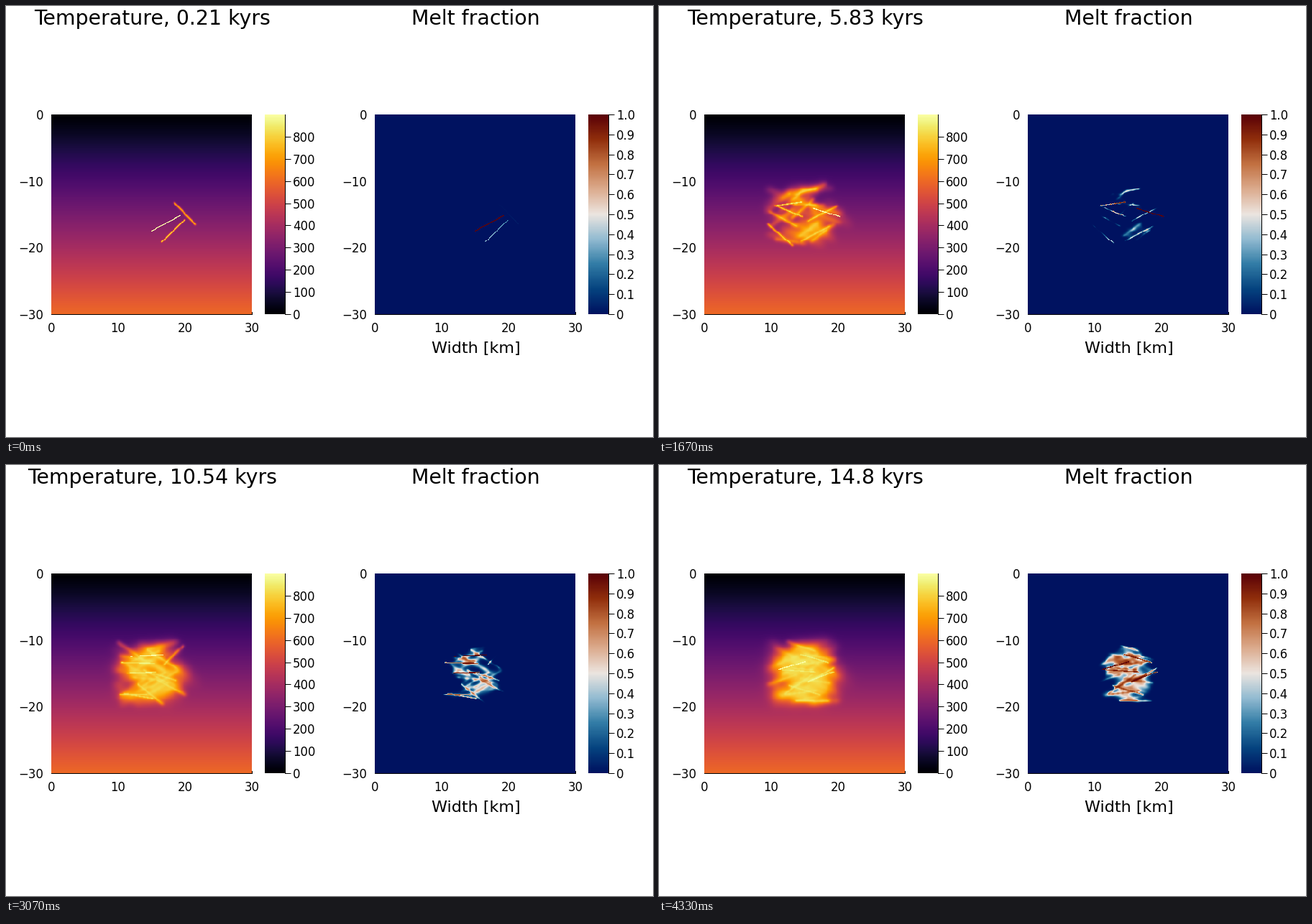
A matplotlib script that plays this animation: 900 px wide and 600 px high, repeating every 4390 ms.

```python
import numpy as np
import matplotlib.pyplot as plt
from matplotlib.animation import FuncAnimation
from matplotlib.colors import LinearSegmentedColormap

W, H, DPI = 900, 600, 100
FRAMES, LOOP_MS = 66, 4390
STEPS, DIKE_PERIOD = 10, 5    # heat steps per frame and per dike
N, SIZE = 301, 30.0           # grid points, domain size in km
T_MAGMA, GRADIENT = 900.0, 20.0
T_HALF, T_SCALE = 800.0, 23.0  # melting curve
DIFFUSION = 0.0708            # kappa * dt / dx^2
LATENT = 300.0                # latent heat / heat capacity
HALF_WIDTH = 0.07             # half thickness of a dike in km

plt.rcParams["font.family"] = "DejaVu Sans"
VIK = LinearSegmentedColormap.from_list("vik", [
    "#001260", "#05437f", "#327ca6", "#92bbd1", "#ece5e0",
    "#dcac8f", "#c37243", "#912f0c", "#590007"])

# The first dikes: centre x, centre y, length in km, dip in degrees
OPENING = [(20.0, -14.9, 4.7, -46), (18.25, -17.5, 4.9, 44), (17.15, -16.35, 4.9, 28)]


def melt_fraction(temp):
    return 1 / (1 + np.exp((T_HALF - temp) / T_SCALE))


def random_dike(rng):
    """A dike that fits inside the intruded box."""
    length, dip = rng.uniform(4.2, 5.2), rng.uniform(-45, 45)
    dx = length / 2 * np.cos(np.radians(dip))
    dy = length / 2 * abs(np.sin(np.radians(dip)))
    x = rng.uniform(9.2 + dx, 20.8 - dx)
    y = rng.uniform(-19.9 + dy, -10.2 - dy)
    return x, y, length, dip


def inject(temp, x, y, length, dip):
    c, s = np.cos(np.radians(dip)), np.sin(np.radians(dip))
    along = (X - x) * c + (Y - y) * s
    across = (Y - y) * c - (X - x) * s
    temp[(abs(along) <= length / 2) & (abs(across) <= HALF_WIDTH)] = T_MAGMA


def diffuse(temp):
    p = np.pad(temp, ((0, 0), (1, 1)), mode="edge")
    flux = p[1:-1, 2:] + p[1:-1, :-2] + p[2:, 1:-1] + p[:-2, 1:-1] - 4 * p[1:-1, 1:-1]
    phi = melt_fraction(temp[1:-1])
    temp[1:-1] += DIFFUSION * flux / (1 + LATENT * phi * (1 - phi) / T_SCALE)


def simulate():
    rng = np.random.default_rng(7)
    dikes = iter(OPENING)
    temp, history = -GRADIENT * Y, []
    for step in range(STEPS * FRAMES + 1):
        diffuse(temp)
        if step % DIKE_PERIOD == 0:
            inject(temp, *(next(dikes, None) or random_dike(rng)))
        if step and step % STEPS == 0:
            history.append(temp.copy())
    return history


X, Y = np.meshgrid(np.linspace(0, SIZE, N), np.linspace(-SIZE, 0, N))
history = simulate()

fig = plt.figure(figsize=(W / DPI, H / DPI), dpi=DPI, facecolor="white")


def pt(px):
    return px * 72 / DPI


def label(x, y, text, size):
    return fig.text(x / W, 1 - y / H, text, fontsize=pt(size),
                    ha="center", va="baseline")


def pixel_axes(x, width):
    ax = fig.add_axes([x / W, 1 - 429 / H, width / W, 278 / H])
    for spine in ax.spines.values():
        spine.set_visible(False)
        spine.set_linewidth(pt(1))
    ax.tick_params(labelsize=pt(16.5))
    return ax


def heatmap(x, cmap):
    ax = pixel_axes(x, 279)
    image = ax.imshow(history[0], cmap=cmap, vmin=0, vmax=1, origin="lower",
                      extent=(0, SIZE, -SIZE, 0), aspect="auto",
                      interpolation="nearest")
    ax.spines["bottom"].set_visible(True)
    ax.plot([SIZE, SIZE], [-SIZE, -SIZE + 0.3], "k", lw=pt(1), clip_on=False)
    ax.set(xlim=(0, SIZE), ylim=(-SIZE, 0),
           xticks=range(0, 31, 10), yticks=range(-30, 1, 10))
    ax.tick_params(axis="x", length=0, pad=pt(10.5))
    ax.tick_params(axis="y", length=0, pad=pt(11))
    return image


def colorbar(x, cmap):
    ax = pixel_axes(x, 28)
    ramp = np.linspace(0, 1, 256)[:, None]
    image = ax.imshow(ramp, cmap=cmap, origin="lower", extent=(0, 1, 0, 1),
                      aspect="auto", interpolation="nearest")
    ax.set_xticks([])
    ax.yaxis.tick_right()
    ax.spines["right"].set_visible(True)
    ax.tick_params(axis="y", length=pt(8), width=pt(1), pad=pt(3))
    return ax, image


temp_image = heatmap(63, "inferno")
melt_image = heatmap(513, VIK)
temp_bar, temp_ramp = colorbar(360, "inferno")
melt_bar, _ = colorbar(810, VIK)
melt_bar.set_yticks(np.arange(11) / 10,
                    ["0"] + [f"{i / 10:.1f}" for i in range(1, 11)])

title = label(203.5, 26.5, "", 28.4)
label(653, 26.5, "Melt fraction", 28.4)
label(653.5, 483.5, "Width [km]", 22.3)


def update(frame):
    temp = history[frame]
    top = temp.max()
    temp_image.set_data(temp)
    temp_image.set_clim(0, top)
    melt_image.set_data(melt_fraction(temp))
    temp_ramp.set_extent((0, 1, 0, top))
    temp_bar.set_ylim(0, top)
    temp_bar.set_yticks(np.arange(0, min(top, 899), 100))
    title.set_text(f"Temperature, {round(0.2144 + 0.22445 * frame, 2)} kyrs")
    return temp_image, melt_image, temp_ramp, title


anim = FuncAnimation(fig, update, frames=FRAMES, interval=LOOP_MS / FRAMES,
                     repeat=True, repeat_delay=0, blit=False)
plt.show()
```
